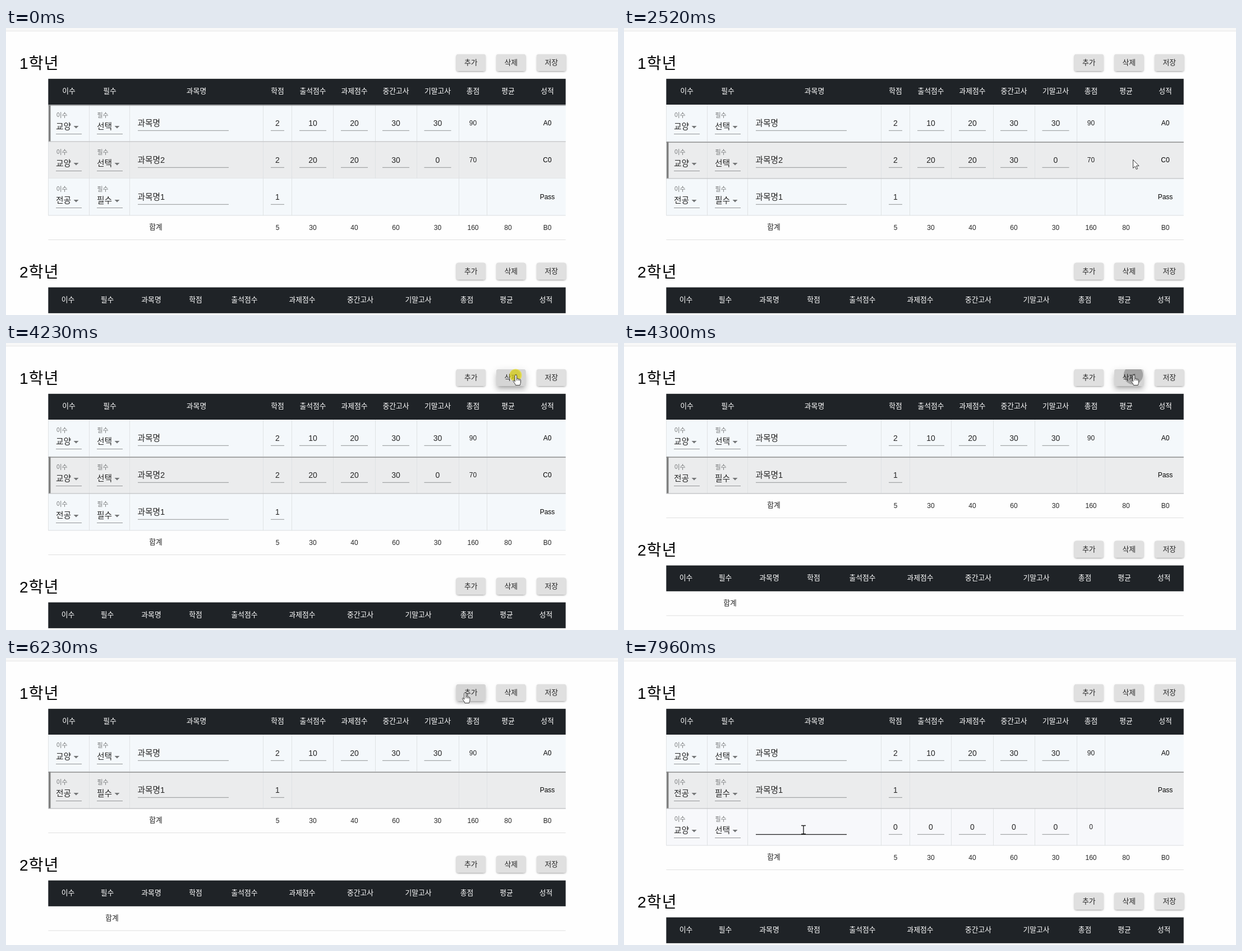
Animation of 1091 by 513 pixels, one loop 8 s. Source, as an HTML page with a canvas:

```html
<!DOCTYPE html>
<html lang="ko">
<head>
<meta charset="utf-8">
<style>
html, body { margin: 0; width: 100%; height: 100%; overflow: hidden; background: #fff; }
canvas { display: block; }
</style>
</head>
<body>
<canvas id="stage" width="1091" height="513"></canvas>
<script>
const ctx = document.getElementById('stage').getContext('2d');
const LOOP = 8000, ROW_H = 66, LEFT = 75.3, RIGHT = 997.7;
const FONT = "'Liberation Sans', 'Noto Sans CJK KR', 'Noto Sans CJK', sans-serif";
const INK = '#262626';

const HEADS = ['이수', '필수', '과목명', '학점', '출석점수', '과제점수', '중간고사', '기말고사', '총점', '평균', '성적'];
const COLS = [112, 185, 339.5, 484, 547, 621, 695, 769.5, 832.5, 895, 965];
const COLS2 = [110.5, 180.5, 259, 338, 425, 528, 631.5, 735, 821.5, 892, 962.5];
const EDGES = [75, 148, 220, 458, 509, 583, 658, 732, 807, 857];
const TOTALS = [5, 30, 40, 60, 30, 160, 80, 'B0'];
const BUTTONS = [['추가', 802.5], ['삭제', 874], ['저장', 946]];

const first = { kind: '교양', need: '선택', name: '과목명', scores: [2, 10, 20, 30, 30], sum: 90, grade: 'A0' };
const second = { kind: '교양', need: '선택', name: '과목명2', scores: [2, 20, 20, 30, 0], sum: 70, grade: 'C0' };
const pass = { kind: '전공', need: '필수', name: '과목명1', scores: [1], sum: '', grade: 'Pass' };
const fresh = { kind: '교양', need: '선택', name: '', scores: [0, 0, 0, 0, 0], sum: 0, grade: '', bg: '#f7f8fb' };

const SELECT = 2320, REMOVE = 4290, ADD = 6530;
const CLICKS = [[2180, SELECT], [4150, REMOVE], [6420, ADD]];
// Button index, pointer enters, pointer leaves, press start, press end
const HOVERS = [[1, 3600, 5340, 4150, REMOVE], [0, 5430, 7200, 6420, ADD]];

// Pointer moves: start, end, target x, target y, sideways bow
const MOVES = [
  [400, 1220, 1036, 267, 0], [1230, 1500, 1027, 242, 0], [1640, 2390, 906.5, 235, 0],
  [2450, 2520, 907, 235, 0], [2850, 3680, 909, 57, 36], [5000, 5260, 894, 68, 0],
  [5260, 5680, 813, 62, 0], [6010, 6230, 818.5, 62, 0], [7140, 7930, 320, 307, 0]
];

const ARROW = new Path2D('M.5 .5V15.5L4 12.3 6.3 17.6 8.6 16.6 6.3 11.4H11Z');
const HAND = new Path2D('M-1.7 12V1.6a1.6 1.6 0 0 1 3.2 0V7a1.5 1.5 0 0 1 2.7.4a1.4 1.4 0 0 1 2.3.8a1.3 1.3 0 0 1 2 1V13c0 2-1 3-1.3 5.5H-.6C-1 16-3.6 13.5-4.8 11.2c-.6-1.4.8-2.2 1.7-1.4z');
const IBEAM = new Path2D('M-4 -7.5H-1L0 -7L1 -7.5H4M0 -7V7M-4 7.5H-1L0 7L1 7.5H4');

const clamp = v => Math.max(0, Math.min(1, v));
const smooth = k => k * k * (3 - 2 * k);
const pulse = (t, from, to) => clamp((t - from) / 250) - clamp((t - to) / 250);

let mouse;

function pointerAt(t) {
  let x = 1057, y = 512;
  for (const [from, to, tx, ty, bow] of MOVES) {
    const k = smooth(clamp((t - from) / (to - from)));
    x += (tx - x) * k + bow * Math.sin(Math.PI * k);
    y += (ty - y) * k;
  }
  return { x, y };
}

function rect(x, y, w, h, color) {
  ctx.fillStyle = color;
  ctx.fillRect(x, y, w, h);
}

function text(s, x, cy, size, color = INK, align = 'center') {
  ctx.font = `350 ${size}px ${FONT}`;
  ctx.textAlign = align;
  ctx.fillStyle = color;
  ctx.fillText(s, x, cy + size * 0.36);
}

const within = (x0, x1, y0, y1) => mouse.x > x0 && mouse.x < x1 && mouse.y > y0 && mouse.y < y1;

// Underlined input that reacts to the pointer
function field(x0, x1, y) {
  const over = within(x0, x1, y - 26, y + 2);
  rect(x0, y - 0.2, x1 - x0, over ? 1.3 : 1, over ? '#222' : '#929496');
  if (over) mouse.shape = IBEAM;
}

function select(label, value, x, y) {
  text(label, x, y + 19, 11, '#757778', 'left');
  text(value, x - 0.5, y + 38.5, 14.7, INK, 'left');
  ctx.fillStyle = '#757778';
  ctx.beginPath();
  ctx.moveTo(x + 31, y + 38);
  ctx.lineTo(x + 40, y + 38);
  ctx.lineTo(x + 35.5, y + 42.5);
  ctx.fill();
  rect(x - 0.5, y + 52, 46, 1, '#929496');
}

function row(data, index, selected) {
  const y = 137 + index * ROW_H;
  rect(LEFT, y, RIGHT - LEFT, ROW_H, data.bg || (index % 2 ? '#ebeced' : '#f4f8fb'));
  for (const x of EDGES)
    if (data.scores.length > 1 || x < 510 || x > 800) rect(x, y, 1, ROW_H, '#dfe2e4');
  rect(LEFT, y + ROW_H - 0.5, RIGHT - LEFT, 1, '#dcdfe1');
  select('이수', data.kind, 89.5, y);
  select('필수', data.need, 162.5, y);
  text(data.name, 234.5, y + 33, 14.7, INK, 'left');
  field(235, 397, y + 46);
  data.scores.forEach((n, i) => {
    const x = COLS[3 + i], half = i ? 24 : 12;
    text(n, x, y + 32.5, 14);
    field(x - half, x + half, y + 46);
  });
  text(data.sum, COLS[8], y + 33, 12);
  text(data.grade, COLS[10], y + 33, 12, '#000');
  if (selected) {
    rect(LEFT, y + ROW_H - 0.5, RIGHT - LEFT, 1, '#bfc0c1');
    rect(LEFT, y + 0.5, RIGHT - LEFT, 1.5, '#929394');
    rect(LEFT + 0.7, y + 0.5, 3.5, ROW_H - 1, '#808080');
  }
}

function shadow(x, y, dy, blur, spread, alpha) {
  ctx.save();
  ctx.shadowColor = `rgba(0,0,0,${alpha})`;
  ctx.shadowBlur = blur;
  ctx.shadowOffsetY = dy;
  ctx.fillStyle = '#e0e0e0';
  ctx.beginPath();
  ctx.roundRect(x - spread, y - spread, 52.5 + 2 * spread, 30 + 2 * spread, 4);
  ctx.fill();
  ctx.restore();
}

function button(label, x, y, hover = 0, press = 0) {
  const lift = hover * 0.4 + press * 0.6;
  shadow(x, y, 2.6 + 2 * lift, 1 + 4 * lift, -2 - lift, 0.2);
  shadow(x, y, 1.7 + 6 * lift, 2 + 8 * lift, 0, 0.14);
  shadow(x, y, 0.9 + 2 * lift, 4.5 + 9 * lift, 0, 0.12);
  const c = 224 - 11 * hover;
  ctx.fillStyle = `rgb(${c},${c},${c})`;
  ctx.beginPath();
  ctx.roundRect(x, y, 52.5, 30, 4);
  ctx.fill();
  text(label, x + 26.2, y + 14.3, 12.8);
  if (within(x, x + 52.5, y, y + 30)) mouse.shape = HAND;
}

function ripple(t, x, y, down, up) {
  const p = clamp((t - down) / 550);
  const fade = 1 - clamp((t - up) / 550);
  if (!p || !fade) return;
  ctx.save();
  ctx.beginPath();
  ctx.roundRect(x, y, 52.5, 30, 4);
  ctx.clip();
  const at = pointerAt(down);
  ctx.fillStyle = `rgba(0,0,0,${0.24 * fade})`;
  ctx.beginPath();
  ctx.arc(at.x - 1, at.y, 45 * (1 - (1 - p) ** 1.5), 0, 7);
  ctx.fill();
  ctx.restore();
}

function heading(title, centers, off) {
  ctx.letterSpacing = '1.2px';
  text(title, 24, 63 + off, 28, '#000', 'left');
  ctx.letterSpacing = '0px';
  rect(LEFT, 90.8 + off, RIGHT - LEFT, 46.2, '#1f2327');
  HEADS.forEach((s, i) => text(s, centers[i], 112.6 + off, 12.8, '#fff'));
}

function totalLine(y, x) {
  text('합계', x, y + 20.3, 12.8);
  rect(LEFT, y + 43, RIGHT - LEFT, 1, '#e0e0e0');
}

function drawPointer(t) {
  if (t < 460) return;
  if (CLICKS.some(([down, up]) => t >= down && t < up)) {
    ctx.fillStyle = 'rgba(236,226,20,.68)';
    ctx.beginPath();
    ctx.arc(mouse.x - 0.5, mouse.y + 0.5, 11, 0, 7);
    ctx.fill();
  }
  ctx.save();
  ctx.translate(mouse.x, mouse.y);
  ctx.lineJoin = 'round';
  ctx.strokeStyle = '#222';
  ctx.lineWidth = mouse.shape === IBEAM ? 1.4 : 0.9;
  ctx.fillStyle = '#fff';
  if (mouse.shape !== IBEAM) ctx.fill(mouse.shape);
  ctx.stroke(mouse.shape);
  if (mouse.shape === HAND) ctx.stroke(new Path2D('M1.5 7V10M4.2 7.6V10.2M6.5 8.5V10.5'));
  ctx.restore();
}

function draw(t) {
  mouse = pointerAt(t);
  mouse.shape = ARROW;
  rect(0, 0, 1091, 513, '#fefefe');
  rect(0, 0, 1091, 5, '#f8f8f8');
  rect(0, 5, 1091, 1, '#e6e6e6');

  const rows = t < REMOVE ? [first, second, pass] : t < ADD ? [first, pass] : [first, pass, fresh];
  const selected = t < SELECT ? 0 : 1;
  const off = 174.8 + ROW_H * rows.length;
  const end = 137 + ROW_H * rows.length;

  heading('1학년', COLS, 0);
  rows.forEach((data, i) => row(data, i, false));
  row(rows[selected], selected, true);
  totalLine(end, 267);
  TOTALS.forEach((n, i) => text(n, COLS[3 + i], end + 21.5, 12));

  heading('2학년', COLS2, off);
  totalLine(137 + off, 189);

  BUTTONS.forEach(([label, x], i) => {
    const h = HOVERS.find(v => v[0] === i);
    if (h) {
      button(label, x, 47, pulse(t, h[1], h[2]), clamp((t - h[3]) / 80) - clamp((t - h[4]) / 250));
      ripple(t, x, 47, h[3], h[4]);
    } else button(label, x, 47);
    button(label, x, 47 + off);
  });
  drawPointer(t);
}

function frame(now) {
  draw(now % LOOP);
  requestAnimationFrame(frame);
}
requestAnimationFrame(frame);
</script>
</body>
</html>
```
